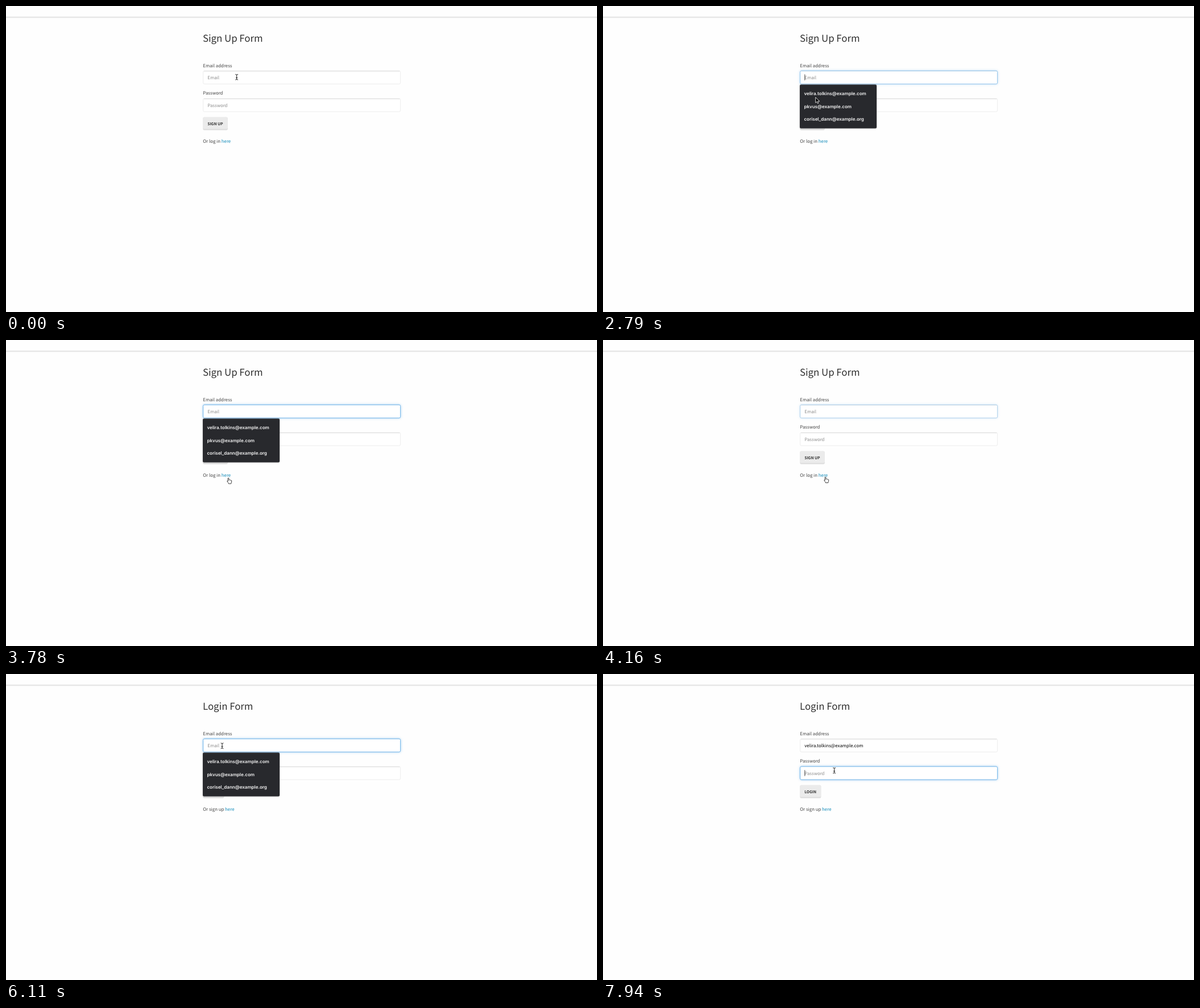
Animation of 1039x539 px, one loop 8 s. Source, as an HTML page:

```html
<!DOCTYPE html>
<html lang="en">
<head>
<meta charset="utf-8">
<title>Sign Up Form</title>
<style>
  html, body { margin: 0; height: 100%; overflow: hidden; background: #fefefe; }
  svg { display: block; width: 1039px; height: 539px; }
  text {
    font: 7.85px "Noto Sans CJK JP", "Noto Sans CJK SC", "Noto Sans", sans-serif;
    text-rendering: geometricPrecision; white-space: pre; fill: #444;
  }
  #title { font-size: 16.8px; fill: #2f2f2f; }
  #action { font-size: 6.72px; font-weight: 700; fill: #333; }
  .hint { fill: #8c8c8c; }
  .link { fill: #158cba; }
  .field { fill: #fff; stroke: #e4e4e4; stroke-width: .7; }
  .inset { stroke: #000; stroke-opacity: .09; stroke-width: 1.3; }
  .ring { fill: #fff; stroke: #66afe9; stroke-width: .9; filter: drop-shadow(0 0 2px rgba(102, 175, 233, .6)); }
  .filled .field, .filled .ring { fill: #e8f0fe; }
  #value { fill: #000; }
  #value.preview { font: 8.35px "Liberation Sans", Arial, sans-serif; }
  #popup text { font: 600 8px Inter, sans-serif; fill: #f4f4f4; }
  #caret { stroke: #222; stroke-width: .8; }
  .cursor path { stroke-linejoin: round; stroke-linecap: round; }
</style>
</head>
<body>
<svg viewBox="0 0 1039 539">
  <defs>
    <g id="box">
      <rect class="field" x="346.6" y="114.2" width="346.8" height="23.1" rx="2.2"/>
      <path class="inset" d="M348 114.9H692"/>
    </g>
  </defs>
  <rect y="18.6" width="1039" height="2.5" fill="#e7e7e7"/>
  <text id="title" x="346" y="63.4"></text>

  <text x="346.3" y="107.6">Email address</text>
  <g id="email">
    <use href="#box"/>
    <rect class="ring" x="346.6" y="114.2" width="346.8" height="23.1" rx="2.2"/>
    <text id="hint" class="hint" x="354.3" y="129">Email</text>
    <text id="value" x="354.3" y="129">velira.tolkins@example.com</text>
  </g>

  <text x="346.3" y="156.4">Password</text>
  <g id="password" transform="translate(0 48.8)">
    <use href="#box"/>
    <rect class="ring" x="346.6" y="114.2" width="346.8" height="23.1" rx="2.2"/>
    <text class="hint" x="354.3" y="129">Password</text>
  </g>

  <rect class="button" x="346.3" y="195.7" height="23" rx="2.5" fill="#dedede"/>
  <rect class="button" x="346.3" y="195.7" height="20.9" rx="2.3" fill="#ebebeb"/>
  <text id="action" x="354.2" y="209.6"></text>
  <text x="346.3" y="240.9"><tspan id="other"></tspan><tspan class="link">here</tspan></text>

  <g id="popup">
    <rect x="346" y="138.5" width="135" height="77" rx="2" fill="#28292d"
      style="filter: drop-shadow(0 .5px 1px rgba(0, 0, 0, .35))"/>
    <rect id="row" x="346" y="143.3" width="135" height="22.5" fill="#47484c"/>
    <text x="353.4" y="157.4">velira.tolkins@example.com</text>
    <text x="353.4" y="179.9">pkvus@example.com</text>
    <text x="353.4" y="202.4">corisel_dann@example.org</text>
  </g>
  <path id="caret" d="M0 120.4V131"/>

  <g id="beam" class="cursor" fill="none">
    <path id="stem" stroke="#fff" stroke-width="1.8" stroke-opacity=".8"
      d="M-2-4.8Q0-4.8 0-3.6Q0-4.8 2-4.8M0-3.8V3.8M-2 4.8Q0 4.8 0 3.6Q0 4.8 2 4.8M-1.2 1.2H1.2"/>
    <path stroke="#111" stroke-width=".9"
      d="M-2-4.8Q0-4.8 0-3.6Q0-4.8 2-4.8M0-3.8V3.8M-2 4.8Q0 4.8 0 3.6Q0 4.8 2 4.8M-1.2 1.2H1.2"/>
  </g>
  <g id="arrow" class="cursor">
    <path fill="#000" stroke="#fff" stroke-width=".8"
      d="M0 0V9.2L2.1 7.2L3.6 10.6L5.2 9.9L3.7 6.7H6.6Z"/>
  </g>
  <g id="hand" class="cursor">
    <path fill="#fff" stroke="#111" stroke-width=".8"
      d="M-.9 .9Q0-.4 .9 .9V4q1-.7 1.7 .2q.9-.5 1.6 .4q1.3-.4 1.4 .9V7.5L4.8 9.6V10.5H.2V9.6Q-1.2 8-2.2 6.2Q-2.5 4.9-.9 5.8Z"/>
  </g>
</svg>
<script>
const LOOP = 8000;
const $ = selector => document.querySelector(selector);
const show = (selector, on) => $(selector).style.display = on ? '' : 'none';

// Each step: start time, then the values held until the next step
const pointer = [
  [0, 'beam', 405.6, 125.2], [300, 'beam', 359.6, 126], [750, 'beam', 367.4, 127],
  [2790, 'arrow', 373.7, 161.2], [3060, 'arrow', 380, 226], [3330, 'arrow', 386, 248],
  [3570, 'hand', 391, 244], [3780, 'hand', 391, 242.6], [4160, 'hand', 391, 241],
  [4820, 'arrow', 388, 215.3], [5060, 'beam', 380.5, 129.5], [5330, 'beam', 380, 126.5],
  [6320, 'beam', 384.5, 133], [6530, 'arrow', 393.8, 147], [6740, 'arrow', 393.6, 149.4],
  [7220, 'beam', 404.8, 164], [7460, 'beam', 406.6, 169.2], [7670, 'beam', 406.6, 170]
];
const emailFocus = [[0, 0], [2790, .75], [3060, .9], [3330, 1], [4160, .5], [4550, 0], [5660, 1], [7940, 0]];
const popupOpen = [[0, 0], [2790, 1], [4160, 0], [5660, 1], [7010, 0]];
const caretX = [[0, 0], [2790, 354.8], [3570, 0], [5660, 354.8], [6110, 0], [6530, 354.8],
  [7010, 458.5], [7460, 0], [7940, 354.8]];

const at = (steps, t) => steps.findLast(step => step[0] <= t).slice(1);

function draw(t) {
  const login = t >= 4550, filled = t >= 6740, accepted = t >= 7010, inPassword = t >= 7940;

  $('#title').textContent = login ? 'Login Form' : 'Sign Up Form';
  $('#action').textContent = login ? 'LOGIN' : 'SIGN UP';
  $('#other').textContent = login ? 'Or sign up ' : 'Or log in ';
  document.querySelectorAll('.button').forEach(b => b.setAttribute('width', login ? 37 : 43.5));

  $('#email .ring').style.opacity = at(emailFocus, t)[0];
  $('#password .ring').style.opacity = +inPassword;
  $('#email').classList.toggle('filled', filled);
  $('#value').classList.toggle('preview', !accepted);
  show('#hint', !filled);
  show('#value', filled);

  show('#popup', at(popupOpen, t)[0]);
  show('#row', filled);

  const [x] = at(caretX, t);
  show('#caret', x);
  $('#caret').setAttribute('transform', `translate(${x} ${inPassword ? 48.8 : 0})`);

  const [shape, px, py] = at(pointer, t);
  for (const name of ['beam', 'arrow', 'hand']) show('#' + name, name === shape);
  $('#' + shape).setAttribute('transform', `translate(${px} ${py})`);
}

function tick() {
  draw(performance.now() % LOOP);
  requestAnimationFrame(tick);
}
tick();
</script>
</body>
</html>
```
